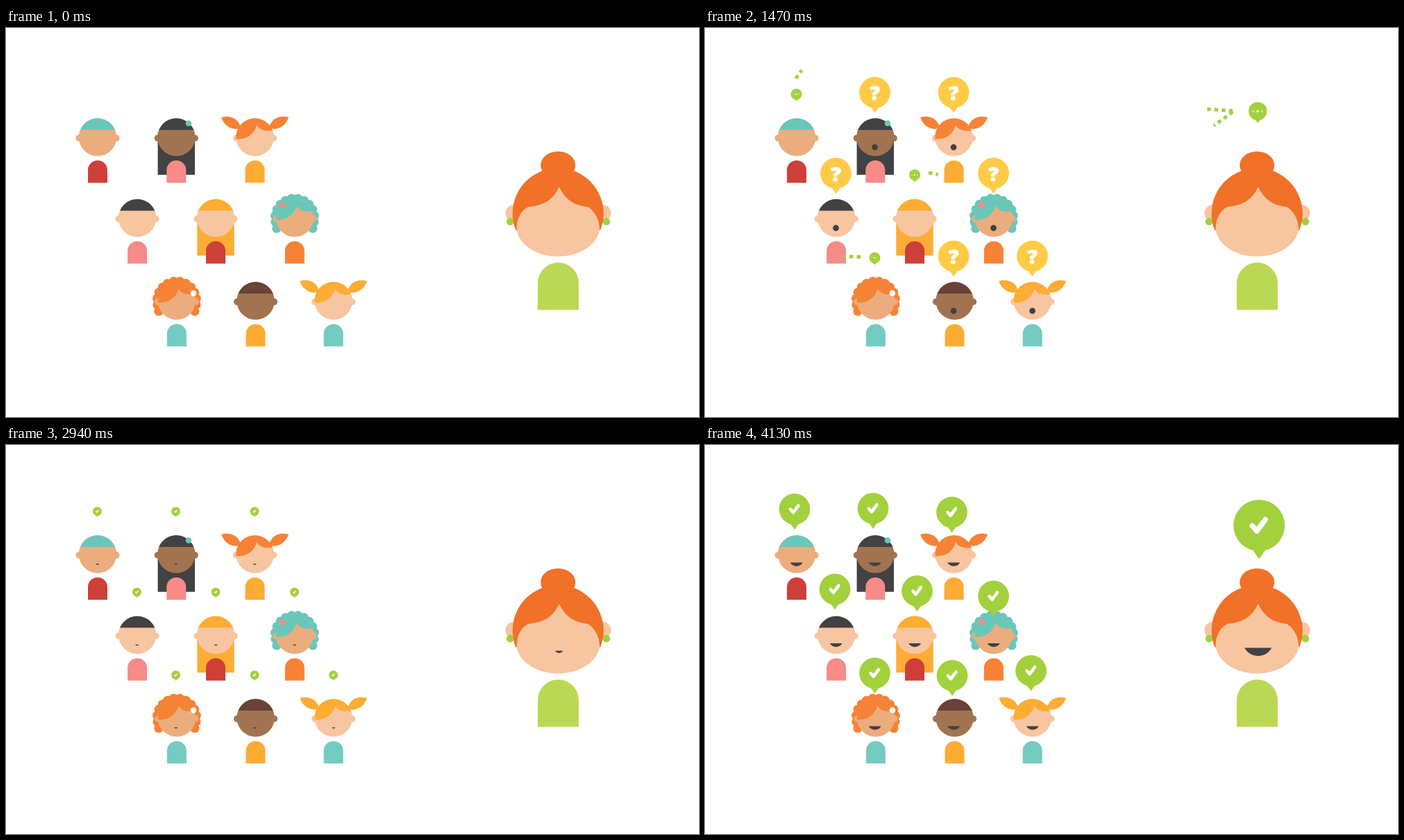
An HTML page with a canvas for the animation above (4.2 s loop, 998x561 px).

```html
<!DOCTYPE html>
<html lang="en">
<head>
<meta charset="utf-8">
<title>Questions and answers</title>
<style>
  html, body { margin: 0; width: 100%; height: 100%; overflow: hidden; background: #fff; }
  canvas { display: block; }
</style>
</head>
<body>
<canvas id="stage" width="998" height="561"></canvas>
<script>
const ctx = document.getElementById('stage').getContext('2d');
const LOOP = 4200, STEP = 70;
const ASK = 770, REPLY = 1470, LEAVE = 2590, DONE = 2955, DONE_BIG = 3015;
const PEACH = '#f7c59f', TAN = '#ebad7e', BROWN = '#a27350', DARK = '#424143',
  TEAL = '#69c7ba', MINT = '#74cbc1', ORANGE = '#f68235', AMBER = '#fdac34',
  RED = '#cf3f39', PINK = '#f68b88', GREEN = '#a2d13d', YELLOW = '#ffcb47';

// x, y: rest place of the bubble; dx: head offset; drift: bubble offsets at each DRIFT_TIMES entry
const people = [
  { x: 131.5, y: 93, dx: .5, style: 'cap', skin: TAN, hair: TEAL, shirt: RED,
    drift: [[-4, -1.5], [0, -2], [-2.5, -.5]] },
  { x: 244.5, y: 93, dx: .8, style: 'long', skin: BROWN, hair: DARK, shirt: PINK, asks: true,
    pin: [17.7, -20, TEAL], drift: [[-.5, -1.5], [-.5, -1.5], [-2.5, -1.5]] },
  { x: 358, y: 93, dx: .5, style: 'tails', skin: PEACH, hair: ORANGE, shirt: AMBER, asks: true,
    drift: [[-.5, .5], [-3, -1], [-2.5, 4]] },
  { x: 188.5, y: 209.5, dx: .6, style: 'cap', skin: PEACH, hair: DARK, shirt: PINK, asks: true,
    drift: [[-1.5, -2.5], [0, 4.5], [-1.5, -1.5]] },
  { x: 302, y: 209.5, dx: 0, style: 'long', skin: PEACH, hair: AMBER, shirt: RED,
    drift: [[0, -2], [-2.5, .5], [3.5, 1]] },
  { x: 415.5, y: 209.5, dx: .3, style: 'curls', skin: TAN, hair: TEAL, shirt: ORANGE, asks: true,
    pin: [-17.7, -18.5, PINK], drift: [[-1, .5], [-2, 5.5], [0, 8.5]] },
  { x: 244.5, y: 329, dx: 1.4, style: 'curls', skin: TAN, hair: ORANGE, shirt: MINT,
    pin: [24, -11, '#fff'], drift: [[-.5, 2], [2, 1], [0, 0]] },
  { x: 358, y: 329, dx: 1.5, style: 'cap', skin: BROWN, hair: '#694238', shirt: AMBER, asks: true,
    drift: [[0, 1], [-2, -1], [-2, 3.5]] },
  { x: 471.5, y: 329, dx: .1, style: 'tails', skin: PEACH, hair: AMBER, shirt: MINT, asks: true,
    drift: [[-2, 4], [-.5, -3], [-2, -3.5]] },
];
const teacher = { x: 796, y: 116, drift: [[2, 3], [-1.5, 0], [2, 0]] };
const BIG = 1.65;
const DRIFT_TIMES = [2940, 3290, 3850, 4130];

// Dotted links, each running from the answer to the question
const links = [
  [131, 73, 156, 29, 208, 29, 241, 71],
  [322, 209, 370, 213, 384, 262, 358, 308],
  [224, 330, 145, 330, 72, 307, 167, 222],
  [760, 119.5, 634, 110.8, 507, 101.7, 380, 93],
  [760, 121, 671.7, 186.3, 583.3, 251.7, 495, 317],
];

const clamp = v => Math.max(0, Math.min(1, v));
const smooth = v => { v = clamp(v); return v * v * (3 - 2 * v); };

// Grow past full size, then settle
function pop(t) {
  const u = t + 75;
  if (u <= 0) return 0;
  if (u < 350) return 1.08 * Math.sin(Math.PI / 2 * u / 350);
  return 1.08 - .08 * clamp((u - 350) / 75);
}

function driftAt(p, t) {
  const stops = [[0, 0], ...p.drift];
  let i = 0;
  while (i < 2 && t > DRIFT_TIMES[i + 1]) i++;
  const k = smooth((t - DRIFT_TIMES[i]) / (DRIFT_TIMES[i + 1] - DRIFT_TIMES[i]));
  return [0, 1].map(a => stops[i][a] + (stops[i + 1][a] - stops[i][a]) * k);
}

function at(x, y, scale, draw) {
  ctx.save();
  ctx.translate(x, y);
  ctx.scale(scale, scale);
  draw();
  ctx.restore();
}

function fill(color, path) {
  ctx.fillStyle = color;
  ctx.beginPath();
  path();
  ctx.fill();
}

function disc(x, y, r, color, ry = r) {
  fill(color, () => ctx.ellipse(x, y, r, ry, 0, 0, 7));
}

function body(x, top, half, height, color) {
  fill(color, () => {
    ctx.arc(x, top + half, half, Math.PI, 0);
    ctx.lineTo(x + half, top + height);
    ctx.lineTo(x - half, top + height);
  });
}

function pigtail() {
  ctx.moveTo(-48.5, -28.5);
  ctx.bezierCurveTo(-37, -32, -23, -28, -20.5, -13);
  ctx.bezierCurveTo(-33, -9, -44, -16, -48.5, -28.5);
}

function person(p) {
  const { style, skin, hair } = p;
  at(p.x + p.dx, p.y + 64.5, 1, () => {
    if (style === 'long') fill(hair, () => ctx.rect(-26.7, 0, 53.4, 54.3));
    if (style === 'curls') {
      for (let i = 0; i < 14; i++) {
        const a = (150 + i * 240 / 13) * Math.PI / 180;
        const r = 28.5 + 1.5 * (i === 0 || i === 13);
        disc(r * Math.cos(a), r * Math.sin(a), 6.6, hair);
      }
    }
    body(0, 33.4, 14, 32.4, p.shirt);
    for (const side of [-1, 1]) disc(side * 26.8, 1.4, 4.8, skin);
    disc(0, 0, 27.2, skin);
    if (style === 'cap' || style === 'long') {
      const a = Math.asin(10.5 / 27.2);
      fill(hair, () => ctx.arc(0, 0, 27.2, Math.PI + a, -a));
    } else {
      fill(hair, () => {
        ctx.moveTo(-27.1, 2.5);
        ctx.bezierCurveTo(-14, 4, -1, -3, 2.5, -17.5);
        ctx.bezierCurveTo(6, -11, 14, -8, 25.3, -9.6);
        ctx.arc(0, 0, 27.2, -.36, Math.PI - .09, true);
      });
    }
    if (style === 'tails') {
      fill(hair, pigtail);
      ctx.scale(-1, 1);
      fill(hair, pigtail);
      ctx.scale(-1, 1);
    }
    if (p.pin) disc(p.pin[0], p.pin[1], 4.3, p.pin[2]);
  });
}

function drawTeacher() {
  const hair = '#f07127';
  body(795.3, 338.3, 29.5, 68.2, '#bbd854');
  for (const side of [-1, 1]) {
    disc(795.3 + side * 64, 267, 12, PEACH);
    disc(795.3 + side * 69.3, 279.2, 5.4, GREEN);
  }
  disc(795, 198, 25, hair, 20);
  fill(hair, () => ctx.arc(795, 267.5, 65.5, Math.PI - .38, .38));
  fill(PEACH, () => {
    ctx.moveTo(796.5, 229);
    ctx.quadraticCurveTo(785, 256, 752, 258);
    ctx.bezierCurveTo(741, 264, 735, 276, 735.5, 291);
    ctx.bezierCurveTo(739, 313, 764, 329.5, 795, 329.5);
    ctx.bezierCurveTo(826, 329.5, 851, 313, 855, 291);
    ctx.bezierCurveTo(855, 277, 848, 264, 838, 258);
    ctx.quadraticCurveTo(809, 256, 796.5, 229);
  });
}

function smile(x, y, half, depth, scale) {
  const r = (half * half + depth * depth) / (2 * depth);
  const a = Math.asin((r - depth) / r);
  at(x, y + depth / 2, scale, () =>
    fill(DARK, () => ctx.arc(0, depth / 2 - r, r, a, Math.PI - a)));
}

function link([x0, y0, x1, y1, x2, y2, x3, y3], amount) {
  if (amount <= 0) return;
  const mix = (a, b, c, d, t) => {
    const s = 1 - t;
    return s * s * s * a + 3 * s * s * t * b + 3 * s * t * t * c + t * t * t * d;
  };
  ctx.strokeStyle = GREEN;
  ctx.lineWidth = 5;
  ctx.lineCap = 'butt';
  ctx.setLineDash([5.5, 5]);
  ctx.beginPath();
  for (let i = 0; i <= 60; i++) {
    const t = amount * i / 60;
    ctx.lineTo(mix(x0, x1, x2, x3, t), mix(y0, y1, y2, y3, t));
  }
  ctx.stroke();
  ctx.setLineDash([]);
}

const marks = {
  ask() {
    ctx.font = '800 29px "Open Sans", sans-serif';
    ctx.textAlign = 'center';
    ctx.fillStyle = ctx.strokeStyle = '#fff';
    ctx.lineWidth = 1;
    ctx.lineJoin = 'round';
    ctx.fillText('?', 0, 11);
    ctx.strokeText('?', 0, 11);
  },
  reply(t) {
    for (let i = -1; i <= 1; i++) {
      const glow = Math.max(0, Math.cos(2 * Math.PI * ((t - REPLY) / 525 - i / 3)));
      disc(i * 10.5, 0, 2.7 + .2 * glow, `rgba(255,255,255,${.5 + .5 * glow})`);
    }
  },
  done() {
    ctx.strokeStyle = '#fff';
    ctx.lineWidth = 4.6;
    ctx.lineCap = ctx.lineJoin = 'round';
    ctx.beginPath();
    ctx.moveTo(-6, .3);
    ctx.lineTo(-2, 4.8);
    ctx.lineTo(5.4, -5.2);
    ctx.stroke();
  },
};

function bubble(x, y, size, scale, kind, t) {
  if (scale <= 0) return;
  const pivot = 3.7;
  at(x, y + pivot * size, size * scale, () => {
    ctx.translate(0, -pivot);
    const color = kind === 'ask' ? YELLOW : GREEN;
    disc(0, 0, 22.4, color);
    fill(color, () => {
      ctx.moveTo(-6.5, 20);
      ctx.lineTo(6.5, 20);
      ctx.lineTo(0, 29.4);
    });
    marks[kind](t);
  });
}

function draw(t) {
  ctx.clearRect(0, 0, 998, 561);
  people.forEach(person);
  drawTeacher();

  const stay = 1 - smooth((t - LEAVE) / 280);
  const ask = pop(t - ASK) * stay;
  const reply = pop(t - REPLY) * stay;
  const done = pop(t - DONE);

  for (const p of people) {
    if (p.asks && ask > 0) disc(p.x, p.y + 79, 4.4 * ask, DARK);
    if (done > 0) smile(p.x + .2, p.y + 76.4, 9, 5.4, done);
  }
  if (done > 0) smile(796.5, 292.5, 19.5, 11.7, done);

  const reach = smooth((t - 1240) / 1160) * stay;
  links.forEach(l => link(l, reach));

  for (const p of people) {
    bubble(p.x, p.y, 1, p.asks ? ask : reply, p.asks ? 'ask' : 'reply', t);
    const [dx, dy] = driftAt(p, t);
    bubble(p.x + dx, p.y + dy, 1, done, 'done', t);
  }
  bubble(teacher.x, teacher.y, BIG, reply, 'reply', t);
  const [dx, dy] = driftAt(teacher, t);
  bubble(teacher.x + dx, teacher.y + dy, BIG, pop(t - DONE_BIG), 'done', t);
}

function tick() {
  const t = performance.now() % LOOP;
  draw(Math.floor(t / STEP) * STEP);
  requestAnimationFrame(tick);
}
tick();
</script>
</body>
</html>
```
